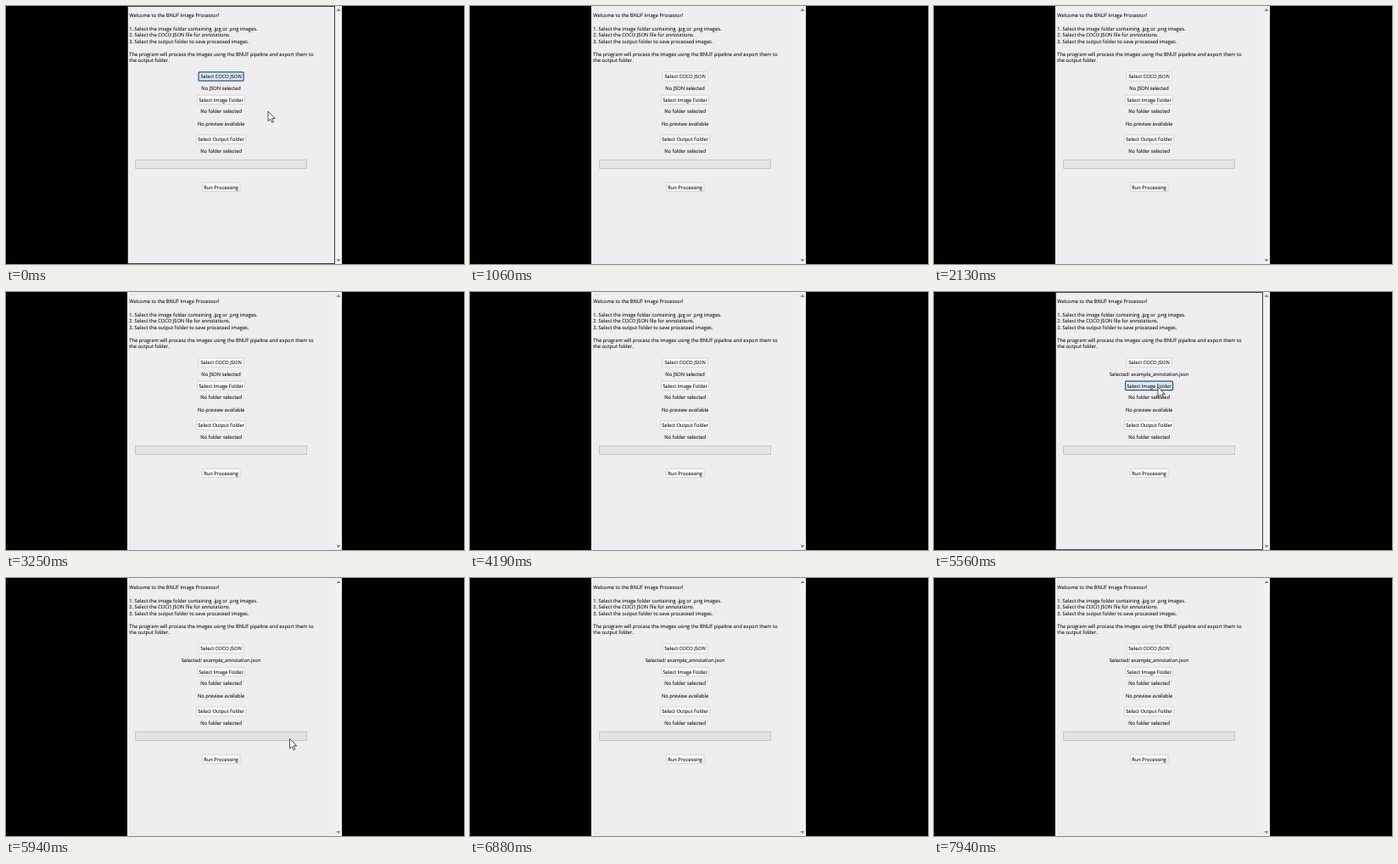
An HTML page that plays this animation: 540x304 px, repeating every 8 s.

```html
<!DOCTYPE html>
<html lang="en">
<head>
<meta charset="utf-8">
<title>Image processor window</title>
<style>
  html, body { margin: 0; width: 100%; height: 100%; overflow: hidden; background: #000; }
  svg { display: block; width: 100%; height: 100%; }
  text {
    font: 5.76px "Open Sans", "Noto Sans", sans-serif;
    fill: #111; stroke: #111; stroke-width: .08; text-rendering: geometricPrecision;
  }
  .mid { text-anchor: middle; }
  .button { fill: #fcfbfc; stroke: #cfcdd0; stroke-width: .8; }
  .button.focus { stroke: #555; }
  .button.pressed { fill: #dfeaf5; stroke: #28527f; stroke-width: 1.2; }
</style>
</head>
<body>
<svg id="stage" viewBox="0 0 540 304">
  <rect width="540" height="304"/>
  <rect x="143" width="253" height="304" fill="#efedf0"/>
  <rect x="388" width="8" height="304" fill="#f2f0f2"/>
  <path d="M389.6 6 392 2.8 394.4 6zM389.6 298.2 392 301.4 394.4 298.2z" fill="#858387"/>
  <rect id="border" x="143.5" y=".5" width="244" height="303" fill="none" stroke="#3c3b3d"/>
  <rect x="152.6" y="181.2" width="201.8" height="10.2" fill="#e5e3e6" stroke="#c3c1c4" stroke-width=".9"/>
  <g id="content"></g>
  <path id="cursor" d="M0 0V11.6L2.7 9.1 4.6 13.2 6.4 12.4 4.5 8.4H8.3Z"
        fill="#fff" stroke="#222" stroke-width=".8" stroke-linejoin="round"/>
</svg>
<script>
const LOOP = 8000, STEP = 62.5;
const $ = id => document.getElementById(id);
const content = $('content');

function add(tag, attrs, text = '') {
  const node = document.createElementNS('http://www.w3.org/2000/svg', tag);
  for (const key in attrs) node.setAttribute(key, attrs[key]);
  node.textContent = text;
  return content.appendChild(node);
}

const label = (text, y) => add('text', { class: 'mid', x: 253.6, y: y + 2.1 }, text);

function button(text, y, width) {
  const box = add('rect', { x: 253.6 - width / 2, y: y - 5.2, width, height: 10.4, rx: 1 });
  label(text, y);
  return box;
}

[
  'Welcome to the BNUF Image Processor!',
  '',
  '1. Select the image folder containing .jpg or .png images.',
  '2. Select the COCO JSON file for annotations.',
  '3. Select the output folder to save processed images.',
  '',
  'The program will process the images using the BNUF pipeline and export them to',
  'the output folder.'
].forEach((line, i) => add('text', { x: 145.3, y: 13.4 + i * 7.58 }, line));

const jsonButton = button('Select COCO JSON', 83, 53);
const jsonLabel = label('', 97);
const imageButton = button('Select Image Folder', 110.4, 56);
label('No folder selected', 124.2);
label('No preview available', 138.8);
const outputButton = button('Select Output Folder', 157.2, 58.4);
label('No folder selected', 171);
const runButton = button('Run Processing', 213.4, 44.6);

// Pointer visits: [time, x, y]
const visits = [
  [[0, 309, 124], [250, 348, 180]],
  [[4980, 391, 209], [5190, 357, 194], [5440, 264, 112], [5600, 264, 112], [5940, 335, 190], [6140, 391, 212]]
];

function pointerAt(t) {
  const path = visits.find(v => t >= v[0][0] && t <= v[v.length - 1][0]);
  if (!path) return null;
  const i = Math.max(1, path.findIndex(p => p[0] >= t));
  const [t0, x0, y0] = path[i - 1], [t1, x1, y1] = path[i];
  const k = (t - t0) / (t1 - t0);
  return [x0 + (x1 - x0) * k, y0 + (y1 - y0) * k];
}

const within = (t, from, to) => t >= from && t < to;
const style = (box, state = '') => box.setAttribute('class', 'button ' + state);
const show = (node, on) => node.setAttribute('visibility', on ? 'visible' : 'hidden');

function render(t) {
  show($('border'), within(t, 0, 250) || within(t, 4680, 5680));
  style(jsonButton, within(t, 0, 250) ? 'pressed' : within(t, 4680, 5480) ? 'focus' : '');
  style(imageButton, within(t, 5480, 5680) ? 'pressed' : '');
  style(outputButton);
  style(runButton);
  jsonLabel.textContent = t < 4680 ? 'No JSON selected' : 'Selected: example_annotation.json';

  const pointer = pointerAt(t);
  show($('cursor'), pointer);
  if (pointer) $('cursor').setAttribute('transform', `translate(${pointer})`);
}

const start = performance.now();
function tick() {
  const t = (performance.now() - start) % LOOP;
  render(Math.floor((t + 5) / STEP) * STEP % LOOP);
  requestAnimationFrame(tick);
}
tick();
</script>
</body>
</html>
```
